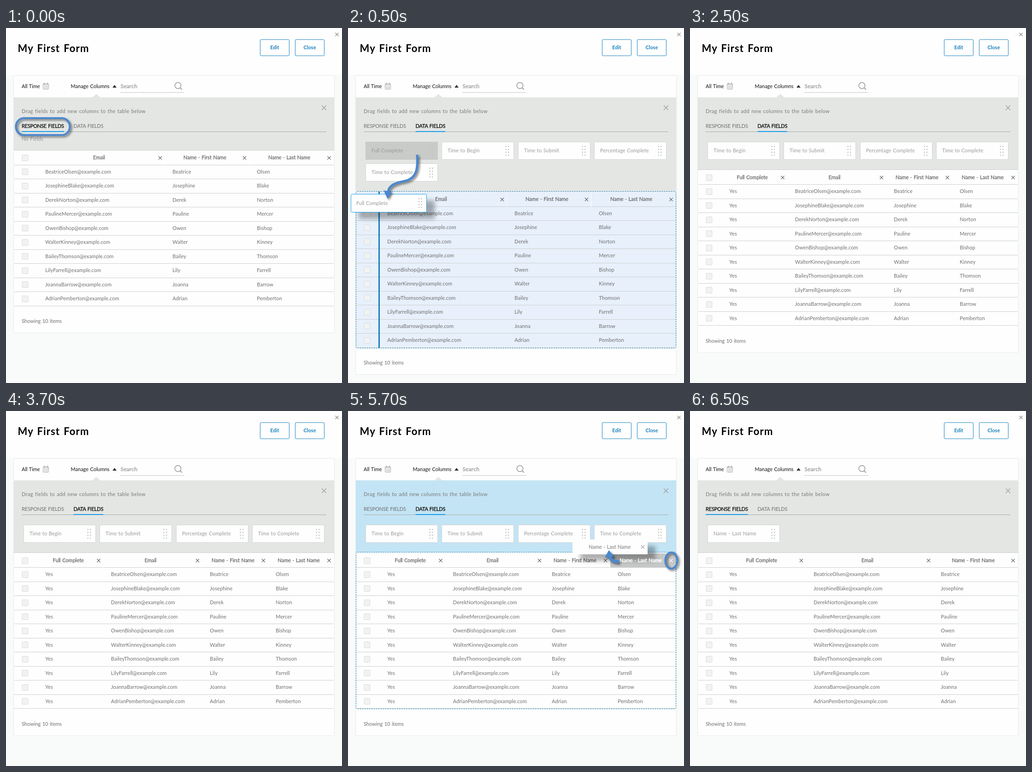
An HTML page for the animation above (8000 ms loop, 729 px wide and 768 px high).

```html
<!DOCTYPE html>
<html lang="en">
<head>
<meta charset="utf-8">
<title>My First Form</title>
<style>
html, body { margin: 0; width: 100%; height: 100%; overflow: hidden; background: #f9fbfa; }
svg { display: block; }
text { font: 11px Lato, Inter, sans-serif; fill: #6e6e6e; word-spacing: .6px; }
.cell { letter-spacing: .1px; }
.mid { text-anchor: middle; }
.dark { fill: #111; }
.pale { fill: #999; letter-spacing: .1px; }
.thick { stroke: #6e6e6e; stroke-width: .35px; }
.dark.thick { stroke: #111; }
.light { fill: #fff; stroke: #fff; }
.faded { fill: #999; stroke: #999; }
.title { font-size: 22px; font-weight: 700; fill: #000; letter-spacing: 1.15px; word-spacing: 1.5px; }
.button { font-weight: 700; fill: #1a82be; text-anchor: middle; }
.hint { letter-spacing: .4px; word-spacing: .8px; fill: #777; }
.tab { letter-spacing: -.17px; }
.search { font-size: 12px; fill: #a5a5a5; stroke: #a5a5a5; stroke-width: .5px; letter-spacing: .2px; }
.mark { filter: drop-shadow(3px 3px 2px rgba(0,0,0,.5)); }
.float { filter: drop-shadow(17px 14px 5px rgba(0,0,0,.3)); }
</style>
</head>
<body>
<svg id="stage" width="729" height="768" viewBox="0 0 729 768"></svg>
<script>
const people = [
  ["Beatrice", "Olsen"], ["Josephine", "Blake"], ["Derek", "Norton"],
  ["Pauline", "Mercer"], ["Owen", "Bishop"], ["Walter", "Kinney"],
  ["Bailey", "Thomson"], ["Lily", "Farrell"], ["Joanna", "Barrow"],
  ["Adrian", "Pemberton"]
];
const FULL = "Full Complete", EMAIL = "Email", FIRST = "Name - First Name", LAST = "Name - Last Name";
const BEGIN = "Time to Begin", SUBMIT = "Time to Submit", PERCENT = "Percentage Complete", DONE = "Time to Complete";
const value = {
  [FULL]: () => "Yes",
  [EMAIL]: ([first, last]) => `${first}${last}@example.com`,
  [FIRST]: p => p[0],
  [LAST]: p => p[1]
};
const BLUE = "#4a88cf", ROW = 30.5;

const text = (x, y, str, cls = "") => `<text x="${x}" y="${y}" class="${cls}">${str}</text>`;
const rect = (x, y, w, h, fill, extra = "") =>
  `<rect x="${x}" y="${y}" width="${w}" height="${h}" fill="${fill}" ${extra}/>`;
const box = (x, y, w, h, fill, stroke, rx = 2) =>
  rect(x + .5, y + .5, w - 1, h - 1, fill, `stroke="${stroke}" rx="${rx}"`);
const path = (d, stroke, width = 1, fill = "none") =>
  `<path d="${d}" fill="${fill}" stroke="${stroke}" stroke-width="${width}"/>`;
const cross = (x, y, r, color, width = 1.1) =>
  path(`M${x - r} ${y - r}l${2 * r} ${2 * r}m0 ${-2 * r}l${-2 * r} ${2 * r}`, color, width);

function grip(x, y, color) {
  let dots = "";
  for (let i = 0; i < 8; i++)
    dots += rect(x + (i % 2) * 5.5, y + (i >> 1) * 6.3, 2.4, 2.4, color, 'rx="1"');
  return dots;
}

function chip(x, y, label, ghost) {
  return (ghost ? rect(x, y, 157, 39, "#c9cbc9") : box(x, y, 157, 39, "#fefefe", "#d3d5d4")) +
    text(x + 13, y + 23, label, "pale") + grip(x + 138.5, y + 9, ghost ? "#c0c2c0" : "#bbb");
}

function header() {
  const button = (x, label) =>
    box(x, 24.5, 64, 36, "#fefefe", "#1a82be") + text(x + 32, 46, label, "button");
  return rect(0, 0, 729, 101, "#fefefe") + text(25.5, 52, "My First Form", "title") +
    button(551, "Edit") + button(627, "Close") + cross(718, 14, 3.5, "#888");
}

function toolbar() {
  let days = "";
  for (let i = 0; i < 9; i++)
    days += rect(82.5 + (i % 3) * 3.2, 124.5 + Math.floor(i / 3) * 2.5, 2, 1.5, "#b5b5b5");
  return text(34, 130, "All Time", "dark") +
    box(80, 120, 13, 13, "none", "#aaa", 1) + rect(80, 122, 13, 1, "#aaa") +
    rect(82, 118.5, 2, 3, "#aaa") + rect(89, 118.5, 2, 3, "#aaa") + days +
    text(140.5, 130, "Manage Columns", "dark") + path("M231 129l4.5-6 4.5 6z", "none", 0, "#333") +
    text(248.5, 129.5, "Search", "search") + rect(248, 139, 139, 1, "#c4c4c4") +
    '<circle cx="373" cy="124.5" r="6.7" fill="none" stroke="#a5a5a5" stroke-width="1.8"/>' +
    path("M377.8 129.3l4 4", "#a5a5a5", 2.2);
}

function panel(s) {
  const fill = s.drop || "#e4e6e4";
  const tab = (x, w, label, on) =>
    text(x, 215.5, label, on ? "tab dark thick" : "tab") + (on ? rect(x, 223, w, 2, "#1a9be8") : "");
  const chips = s.chips.map((label, i) =>
    chip(Math.round(38 + (i % 4) * 165.4), i < 4 ? 246 : 293, label, label === s.ghost));
  return rect(17, 150, 695, s.top - 182, fill) +
    path("M187 150.5l9-8 9 8z", "none", 0, "#e4e6e4") +
    text(34, 184, "Drag fields to add new columns to the table below", "hint") +
    cross(690, 172.5, 5, "#999") + rect(34, 224, 661, 1, "#a8aaa9") +
    tab(34, 92, "RESPONSE FIELDS", !s.data) + tab(146.5, 64.5, "DATA FIELDS", s.data) +
    chips.join("") + (s.chips.length ? "" : text(34, 243.5, "No Fields", "pale"));
}

// s.top is the line under the column headings
function table(s) {
  const { top, edges } = s, start = Math.floor(top - 32), tint = s.tint || "#fefefe";
  const check = y => box(34.5, Math.round(y) - 7, 14, 14, "#f1f3f2", "#dadcda", 1);
  let out = rect(17, start, 695, 338, tint) + rect(17, start, 695, 1, s.dashed ? tint : "#cfd1d0");
  for (let i = 0; i <= people.length; i++)
    out += rect(18, Math.floor(top + i * ROW), 693, 1, "#cdcfce");
  out += check(top - 15);
  s.cols.forEach((col, i) => {
    const x = edges[i], end = edges[i + 1], gone = col === s.lifted;
    out += rect(Math.floor(x) - 1, start + 1, 1, 32, "#fefefe");
    if (gone) out += rect(x, start + 2, end - x, 31, "#c6c8c7");
    out += text((x + end) / 2 - 5, Math.round(top - 12), col, "mid thick" + (gone ? " light" : "")) +
      cross(end - 10.5, top - 15, 3.6, gone ? "#fff" : "#555");
  });
  people.forEach((p, r) => {
    const y = top + r * ROW;
    out += check(y + 15) + s.cols.map((col, i) =>
      text(edges[i] + 16.3, Math.floor(y + 19), value[col](p), "cell")).join("");
  });
  if (s.dashed) out += rect(17.5, start - .5, 694, 339, "none",
    'rx="3" stroke="#2385b5" stroke-dasharray="3 2"');
  return out + text(34, Math.round(top + 342), "Showing 10 items");
}

const mark = inner => `<g class="mark">${inner}</g>`;
const ring = (x, y, w, h, r) => mark(
  rect(x, y, w, h, "none", `rx="${r}" ry="${h / 2}" stroke="${BLUE}" stroke-width="4.2"`));
const arrow = (line, head, width) => mark(path(line, BLUE, width) + path(head, "none", 0, BLUE));

const moveIn = rect(66, 354, 3, 338, "#1a80bd") +
  `<g class="float">${box(6, 359, 165, 40, "#fefefe", "#1a9be8")}</g>` +
  text(18, 382.5, FULL, "pale") + grip(153, 368, "#bbb") +
  arrow("M150 274C152 304 150 327 119 332C98 336 88 343 87 355", "M86 370L77.5 351.5L95 354z", 5);

const moveOut = `<g class="float">${rect(487, 278, 163, 32, "#fefefe")}</g>` +
  text(635, 327, LAST, "mid thick light") + text(568, 298, LAST, "mid thick faded") +
  cross(639.5, 294, 3.6, "#999") +
  arrow("M588 325.5C577 327 570 323 568 314", "M566 301L557 317L577.5 315z", 7) +
  ring(688.5, 306, 26, 35, 13);

const wide = { cols: [EMAIL, FIRST, LAST], edges: [69, 345, 528, 711.5] };
const four = {
  cols: [FULL, EMAIL, FIRST, LAST], edges: [69, 211.5, 426, 569, 711.5],
  top: 338.5, data: true, chips: [BEGIN, SUBMIT, PERCENT, DONE]
};
const scenes = [
  { at: 0, ...wide, top: 296, chips: [], over: ring(21.5, 195, 117, 36.5, 17) },
  { at: 500, ...wide, top: 386, data: true, chips: [FULL, BEGIN, SUBMIT, PERCENT, DONE],
    ghost: FULL, tint: "#e7f0fb", dashed: true, over: moveIn },
  { at: 2500, ...four },
  { at: 4500, ...four, drop: "#c3e4f5", dashed: true, lifted: LAST, over: moveOut },
  { at: 6500, cols: [FULL, EMAIL, FIRST], edges: [69, 252, 528, 711.5], top: 338.5, chips: [LAST] }
];

const draw = s => `<g>${box(16, 102, 697, Math.round(s.top + 363) - 101, "#fefefe", "#e7e9e8", 1)}` +
  toolbar() + panel(s) + table(s) + (s.over || "") + "</g>";
const stage = document.getElementById("stage");
stage.innerHTML = rect(0, 0, 729, 768, "#f9fbfa") + header() + `<g id="views">${scenes.map(draw).join("")}</g>`;
const views = [...document.getElementById("views").children];

let begin;
function show(now) {
  begin ??= now;
  const t = (now - begin) % 8000;
  const current = scenes.findLastIndex(s => t >= s.at);
  views.forEach((v, i) => v.style.display = i === current ? "" : "none");
  requestAnimationFrame(show);
}
show(performance.now());
</script>
</body>
</html>
```
